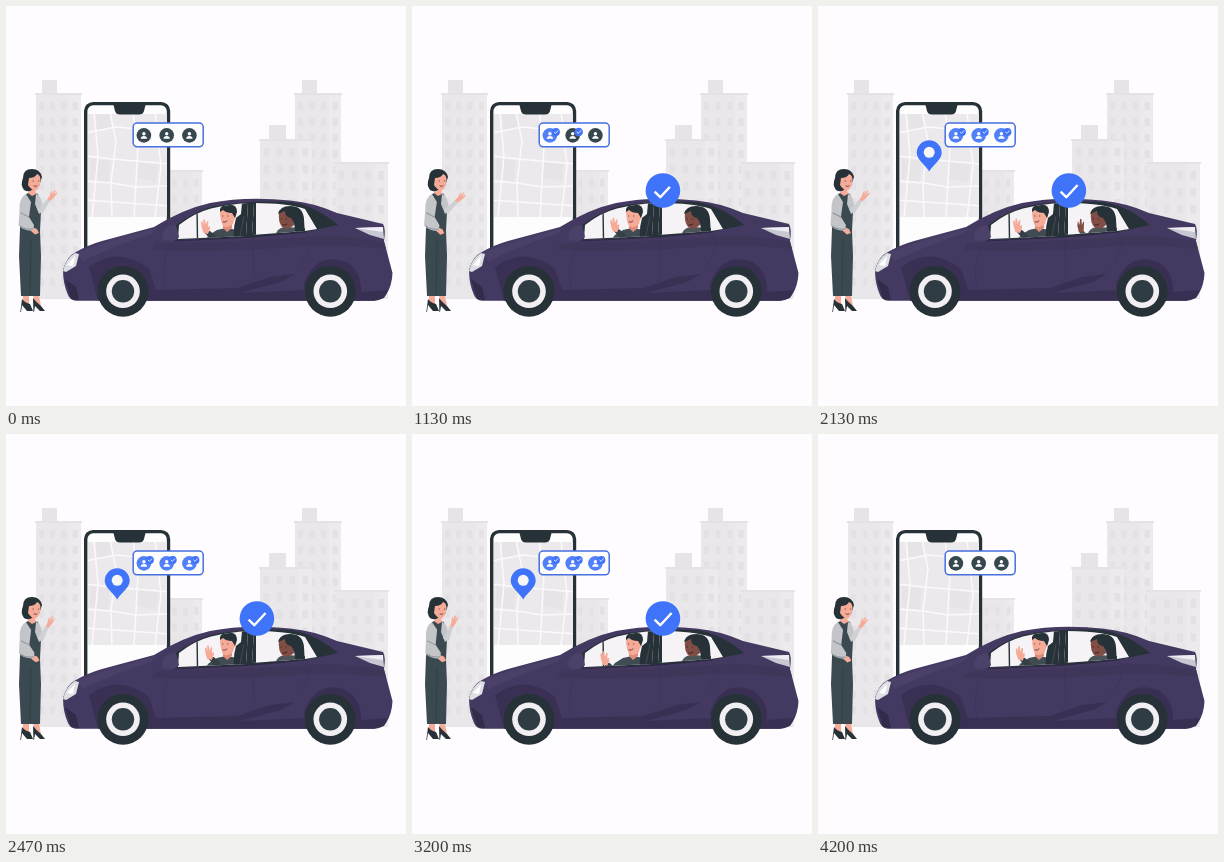
Write an HTML page that moves like this. It is 400 by 400 pixels and loops after 4.27 s.

```html
<!DOCTYPE html>
<html lang="en">
<head>
<meta charset="utf-8">
<title>Car sharing</title>
<style>
html, body { margin: 0; width: 100%; height: 100%; overflow: hidden; background: #fefcfe; }
svg { display: block; width: 100vw; height: 100vh; }
.ink { fill: #263238; }
.skin { fill: #f5ab98; }
.line { fill: none; stroke-linecap: round; stroke-linejoin: round; }
</style>
</head>
<body>
<svg viewBox="0 0 400 400">
  <defs>
    <clipPath id="screen"><rect x="82" y="108" width="79" height="103"/></clipPath>
    <clipPath id="glass">
      <path d="M172 233 L173 219 Q188 207 205 202.5 Q224 198 242 197 L240 230Z"/>
      <path d="M246 229 L248 197 Q281 197 299 203 L311 223 L299 225Z"/>
    </clipPath>
  </defs>

  <g id="city"></g>

  <!-- phone -->
  <rect x="79.7" y="97.6" width="82.8" height="152" rx="7.5" fill="#fefdfe" stroke="#263238" stroke-width="3.4"/>
  <g clip-path="url(#screen)">
    <rect x="82" y="108" width="79" height="103" fill="#ebe9ec"/>
    <path d="M90 108 L103 107 L106 121 L91 124Z M84 152 L104 155 L102 176 L84 173Z M132 154 L152 157 L150 176 L131 172Z" fill="#e6e4e7"/>
    <g class="line" stroke="#fbf9fb" stroke-width="1.5">
      <path d="M80 127 L110 121 L165 126 M80 150 L106 153 L165 158 M80 175 L105 177 L130 181 L165 180 M80 194 L165 200"/>
      <path d="M88 106 L92 150 L86 212 M104 106 L110 135 L105 177 L106 212 M127 106 L132 140 L128 212 M149 106 L155 160 L149 212"/>
    </g>
  </g>
  <path class="ink" d="M107 97 H140 L138 105 Q137 108.5 133 108.5 H114 Q110 108.5 109 105Z"/>

  <!-- pedestrian -->
  <g>
    <path class="skin" d="M17 285 H23 L23 300 L17 299Z M26 285 H32 L35 300 L29 298Z"/>
    <path class="ink" d="M16 293 Q19 297 24 298 L27 305 H21 L16 299 L15 306 H14.3Z M27 292 Q30 296 35 300 L39 305 H34 L29 300 L28 306 H27.4Z"/>
    <path d="M20 188 Q25 185 32 188 L35 205 L34 225 L35 250 L34 290 H15 L13 250 L14 222Z" fill="#3b4a51"/>
    <path d="M25 234 L24 288" class="line" stroke="#2f3d44" stroke-width=".8"/>
    <path class="skin" d="M23 182 H29 L30 188 L26 190 L22 187Z"/>
    <g>
      <path d="M30 188 Q34 188 36 198 L37.5 205 L33 208 L29 198Z" fill="#c3c5c9"/>
      <g id="forearm">
        <path d="M31 206 L32.3 191 H35.7 L37 206Z" fill="#cfd0d4"/>
        <path class="skin" d="M32.4 191.5 L32.3 187 Q30.3 183 31.5 181 L33 185 L33 179.5 L34.4 179.5 L34.8 184 L36 180 L37 180.5 L36.6 187 L35.6 191.5Z"/>
      </g>
    </g>
    <g id="sideArm">
      <path class="skin" d="M26 221 L31 223 L33 227 L29 228.5 L25 225Z"/>
      <path d="M20 188 Q13 191 13.5 205 L12.5 219 Q15 224 27 225 L28 219 L23 211 L25 196Z" fill="#c3c5c9"/>
      <path d="M15 207 L23 211 M14 220 Q19 224 27 223" class="line" stroke="#8b9297" stroke-width="1"/>
    </g>
    <path class="ink" d="M26 163 Q17 163 17 172 Q14 179 18 184 Q23 187 27 183 L33 180 L36 171 Q34 163 26 163Z"/>
    <path class="skin" d="M23 172 Q29 172 31 168 Q34.5 169 34.5 174 Q34 182 30 184.5 Q25 184 22 179Z"/>
    <path d="M27 175 h.4 M32.5 175 h.4 M28 180 Q30 181 31 180" class="line" stroke="#653c38" stroke-width=".9"/>
  </g>

  <!-- car -->
  <g>
    <path d="M57 264 Q61 250 70 246 Q82 239 96 235 L148 221 Q177 203 204 197 Q240 190 284 194.5 Q309 197 331 207 L377 218 Q380 223 378 235 L386.5 267 Q386 280 380 289 Q377 294 368 294.8 H70 Q64 294 62 289 Q57 278 57 264Z" fill="#443a61"/>
    <path d="M70 247 Q96 236 151 222 L145 228 Q112 238 77 255Z" fill="#4a4068"/>
    <path d="M83 261 Q112 239 143 263 L150 284 L232 282 L264 271 L289 268 L275 276 L234 287 L300 284 V294.8 H92Z" fill="#393053"/>
    <path d="M298 278 Q310 245 340 256 Q356 266 355 286 L382 284 L378 292 L368 294.8 H300Z" fill="#382f52"/>
    <path d="M150 237 Q230 236 300 231 Q340 228 378 236 L380 243 Q338 239 300 240 Q220 247 145 244Z" fill="#403659"/>
    <path d="M57 265 Q60 252 69 247 L73 248 L70 260 L60 266Z" fill="#dedfe4"/>
    <path d="M61 259 L69 250 L67 260Z" fill="#fff"/>
    <path d="M59 273 L70 281 L73 294 L65 293Z" fill="#332b4a"/>
    <path d="M349 222 L377 221 L378 233 L364 229Z" fill="#c8c8d2"/>
    <path d="M349 222 L377 221 L377 226Z" fill="#efeff3"/>
    <path d="M165 234 L170 219 Q188 206 205 201 Q240 194 285 196 Q310 200 332 219 L300 226 L247 231Z" class="ink"/>
    <g clip-path="url(#glass)">
      <rect x="160" y="190" width="180" height="50" fill="#f5f3f6"/>
      <path d="M191 200 L191.5 235" stroke="#263238" stroke-width="1.4"/>
      <!-- driver -->
      <path d="M211 224 L220 222 L232 224 L233 234 H199 L203 229Z" fill="#404b52"/>
      <path d="M217 216 H226 V222 L221 226 L217 222Z" fill="#df8b79"/>
      <path class="skin" d="M214 205 Q221 199 229 205 Q232 209 228 214 L227 218 Q222 223 217 220 Q214 214 214 205Z"/>
      <path class="ink" d="M214 206 Q213 199 221 199 Q231 197 231 206 L229 212 L226 207 Q220 207 217 204Z"/>
      <path d="M216.5 210 h.4 M221.5 210 h.4 M217 216 Q219 217 221 215" class="line" stroke="#653c38" stroke-width=".9"/>
      <g id="driverHand">
        <path d="M-2 6 L4 5 L11 11 L6 15Z" fill="#343f46"/>
        <path class="skin" d="M-2.5 7 Q-5 1 -5 -4 L-3.6 -4.5 L-2.6 -1 L-2.6 -6.5 L-1 -6.5 L-.2 -1 L1.2 -5 L2.4 -4.5 L2 1 L4 0 L4 3 L2 8Z"/>
      </g>
      <path class="ink" d="M236 197 H250 V234 H228 Q227 222 230 212 L235 208Z"/>
      <path d="M238 210 L234 230" stroke="#45525a" stroke-width=".8"/>
      <!-- passenger -->
      <path d="M269 231 Q270 222 279 221 L299 222 V235Z" fill="#4c555a"/>
      <path d="M273 207 Q279 200 287 206 L288 219 Q282 225 276 221 Q272 216 273 207Z" fill="#814e46"/>
      <path class="ink" d="M272 208 Q274 200 284 200 Q297 200 298 213 L299 230 L289 225 Q289 217 285 212 Q279 211 279 205Z"/>
      <path d="M275 213 h.4 M280 213 h.4 M277 219 Q279 220 281 218" class="line" stroke="#361e1d" stroke-width=".9"/>
      <g id="riderHand">
        <path d="M-2 6 L3 6 L9 13 L2 15Z" fill="#4c555a"/>
        <path d="M-2 7 L-3.5 1 L-3 -4 L-1.4 0 L-.8 -6 L.6 -6 L1 0 L2.5 -3.5 L3.2 -3 L2.8 7Z" fill="#814e46"/>
      </g>
    </g>
    <path d="M156 230 Q158 219 170 219 L173 231 Q169 237 157 234Z" fill="#4b4169"/>
    <path d="M169 235 L247 231 L300 226" class="line" stroke="#2f2845" stroke-width="1.2"/>
    <path d="M247 231 L248 270 L236 290 M169 235 Q152 252 160 290 M300 226 Q310 239 293 260" class="line" stroke="#3c3357" stroke-width=".6"/>
    <g id="wheels"></g>
  </g>

  <!-- roof bubble -->
  <g id="bubble">
    <circle cx="250.9" cy="184.5" r="17.3" fill="#3f73fa"/>
    <path id="tick" class="line" d="M242.6 185.7 L248.3 191.2 L259.6 179" pathLength="100" stroke="#fff" stroke-width="2.4" style="stroke-linecap: butt" stroke-dasharray="0 200"/>
  </g>

  <!-- people card -->
  <rect x="127.2" y="117" width="70" height="23.8" rx="4" fill="#fefdfe" stroke="#466fdf" stroke-width="1.5"/>
  <g id="people"></g>

  <g id="pin">
    <path d="M111.2 165.5 C107.5 159 98.7 154 98.7 146.8 A12.5 12.5 0 0 1 123.7 146.8 C123.7 154 115 159 111.2 165.5Z" fill="#3f73fa"/>
    <circle cx="111.2" cy="146.3" r="5.5" fill="#f6f6f7"/>
  </g>
</svg>
<script>
const LOOP = 4270, STEP = LOOP / 64, WAVE = LOOP / 5;
const $ = id => document.getElementById(id);
const rect = (x, y, w, h, fill) => `<rect x="${x}" y="${y}" width="${w}" height="${h}" fill="${fill}"/>`;

// Facade with a ledge, a shaded side and a grid of windows.
function building(x, y, w, h, cols, pitch) {
  let out = rect(x, y, w, h, '#e9e7ea') + rect(x + w * .74, y, w * .26, h, '#eceaed')
    + rect(x - 1, y, w + 2, 2, '#e4e2e5');
  const gap = w / cols;
  for (let wy = y + 9; wy < y + h - pitch; wy += pitch)
    for (let c = 0; c < cols; c++)
      out += rect(x + gap * (c + .28), wy, gap * .42, pitch * .5, '#e3e1e4');
  return out;
}

const roofBox = (x, y, w) => rect(x, y, w, 14, '#e6e4e7');

$('city').innerHTML =
  roofBox(36, 74, 15) + building(30, 87, 45, 206, 4, 16)
  + building(163, 164, 33, 90, 3, 16)
  + roofBox(296, 74, 15) + building(289, 87, 46, 150, 4, 16)
  + roofBox(263, 119, 17) + building(254, 133, 52, 90, 4, 17)
  + building(329, 156, 53, 137, 4, 17)
  + rect(30, 292, 350, 1, '#e6e4e7');

$('wheels').innerHTML = [117, 324.3].map(x => {
  const disc = (r, fill) => `<circle cx="${x}" cy="285.3" r="${r}" fill="${fill}"/>`;
  return disc(25.4, '#263238') + disc(16.8, '#f1eff2') + disc(11.2, '#2f3c43');
}).join('');

$('people').innerHTML = [137.9, 160.7, 183.4].map(x => `<g transform="translate(${x} 129.4)">
  <circle class="face" r="7.3"/>
  <circle cy="-1.7" r="1.7" fill="#fff"/>
  <path d="M-3.2 3.3 Q-3 .6 0 .6 Q3 .6 3.2 3.3Z" fill="#fff"/>
  <g class="badge"><circle r="4" fill="#3f73fa"/>
  <path class="line" d="M-1.8 0 L-.4 1.4 L2 -1.3" stroke="#fff" stroke-width=".8"/></g></g>`).join('');

const faces = document.querySelectorAll('.face');
const badges = document.querySelectorAll('.badge');

// Smooth interpolation through [time, value] stops.
function at(stops, t) {
  if (t <= stops[0][0]) return stops[0][1];
  for (let i = 1; i < stops.length; i++) {
    const [t1, v1] = stops[i], [t0, v0] = stops[i - 1];
    if (t <= t1) {
      const u = (t - t0) / (t1 - t0);
      return v0 + (v1 - v0) * u * u * (3 - 2 * u);
    }
  }
  return stops.at(-1)[1];
}

const mix = (a, b, u) => `rgb(${a.map((v, i) => Math.round(v + (b[i] - v) * u))})`;
const set = (el, value) => el.setAttribute('transform', value);
const scaleAt = (x, y, s, turn = 0) =>
  `translate(${x} ${y}) rotate(${turn}) scale(${s}) translate(${-x} ${-y})`;

const armTurn = [[0, 36], [.33, 44], [.785, 22], [1, 36]];
const driverX = [[0, 200], [.215, 205], [.494, 200], [.785, 193], [.873, 204], [1, 200]];
const driverY = [[0, 220], [.215, 218], [.5, 219], [.785, 224], [.873, 218], [1, 220]];
const riderUp = [[1070, 0], [1330, 1], [2270, 1], [2600, 0]];
const bubbleSize = [[600, 0], [670, .14], [870, 1.08], [1000, 1], [3670, 1], [3740, 1.06], [4000, 0]];
const pinSize = [[1200, 0], [1530, 1.03], [1670, 1], [3800, 1], [4070, 0]];
const pinTurn = [[1200, -30], [1600, 27], [1800, -12], [2000, 3], [2130, 0]];

function draw(t) {
  const p = t % WAVE / WAVE, turn = at(armTurn, p);
  set($('forearm'), `rotate(${turn} 34 206)`);
  set($('sideArm'), `rotate(${(turn - 36) / 8} 18 190)`);
  set($('driverHand'), `translate(${at(driverX, p)} ${at(driverY, p)})`);

  const up = at(riderUp, t);
  set($('riderHand'), `translate(${264 + 1.6 * Math.sin((p - .63) * 2 * Math.PI)} ${219 + 22 * (1 - up)})`);

  set($('bubble'), scaleAt(234, 197, at(bubbleSize, t)));
  const head = at([[870, 0], [1200, 100]], t), tail = at([[3470, 0], [3670, 100]], t);
  $('tick').setAttribute('stroke-dasharray', `0 ${tail} ${Math.max(0, head - tail)} 200`);

  set($('pin'), scaleAt(111.2, 165.5, at(pinSize, t), at(pinTurn, t)));

  faces.forEach((face, i) => {
    const on = 530 + i * 400, off = 3470 + i * 170;
    const blue = at([[on + 200, 0], [on + 340, 1], [off, 1], [off + 200, 0]], t);
    const size = at([[on, 0], [on + 140, .95], [on + 220, 1.08], [on + 300, 1], [off + 70, 1], [off + 250, 0]], t);
    face.setAttribute('fill', mix([55, 71, 79], [82, 128, 248], blue));
    set(badges[i], `translate(6 -3.4) scale(${size})`);
  });
}

const start = performance.now();
function tick() {
  const t = (performance.now() - start) % LOOP;
  draw(Math.min(63, Math.floor((t + 5) / STEP)) * STEP);
  requestAnimationFrame(tick);
}
tick();
</script>
</body>
</html>
```
